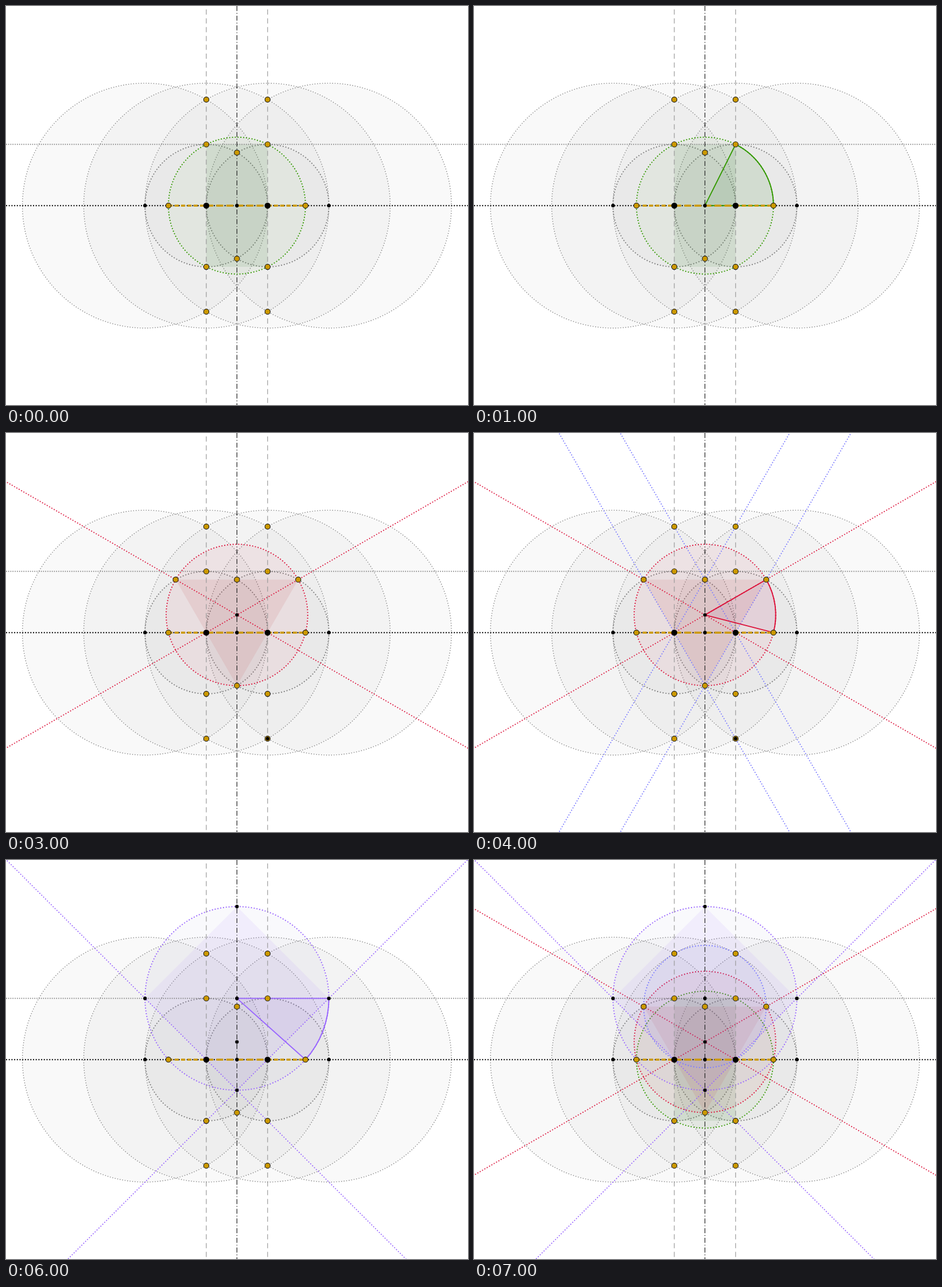
Recreate the animation shown at these times as an HTML page. Size 805 by 696 pixels, loop 8000 ms.

```html
<!DOCTYPE html>
<html lang="en">
<head>
<meta charset="utf-8">
<title>Compass construction</title>
<style>
html, body { margin: 0; width: 100%; height: 100%; overflow: hidden; background: #fff; }
svg { display: block; width: 805px; height: 696px; }
.step { animation: 8s step-end infinite; }
</style>
</head>
<body>
<svg id="stage" viewBox="0 0 805 696" fill="none"></svg>
<script>
const W = 805, H = 696;
const U = 106.8, CX = 402.4, CY = 348.2;
const AX = CX - U / 2, BX = CX + U / 2, LX = AX - U, RX = BX + U;
const TOP = CY - U, H3 = U * Math.sqrt(3) / 2;
const GOLDEN = U * Math.sqrt(5) / 2;          // half length of the gold segment
const RED_R = 2 * U / Math.sqrt(3), RED_Y = CY + H3 - RED_R;
const SQ_R = 1.5 * U;
const GREEN = '#339900', RED = '#dc143c', BLUE = '#7d7dff', PURPLE = '#9966ff', GOLD = '#cc9900';

// Shows a group during the steps marked 1; each step lasts one second.
let css = '';
function step(marks, content) {
  const name = 's' + marks;
  if (!css.includes(name + '{')) {
    const keys = [...marks].map((m, i) => `${i * 12.5}%{opacity:${m}}`).join('');
    css += `@keyframes ${name}{${keys}100%{opacity:${marks[0]}}}`;
  }
  return `<g class="step" style="animation-name:${name}">${content}</g>`;
}

const circle = (x, y, r, color, width, fill = color) =>
  `<circle cx="${x}" cy="${y}" r="${r}" fill="${fill}" fill-opacity=".05" stroke="${color}" stroke-width="${width}" stroke-dasharray="${width} 3"/>`;
const line = (x1, y1, x2, y2, color, width, dash) =>
  `<path d="M${x1} ${y1}L${x2} ${y2}" stroke="${color}" stroke-width="${width}" stroke-dasharray="${dash}"/>`;
const shape = (pts, color) =>
  `<polygon points="${pts.join(' ')}" fill="${color}" fill-opacity=".08"/>`;
const sector = (x, y, r, x1, y1, x2, y2, color, fill) =>
  `<path d="M${x} ${y}L${x1} ${y1}A${r} ${r} 0 0 1 ${x2} ${y2}Z" fill="${fill}" fill-opacity=".07" stroke="${color}" stroke-width="1.9" stroke-linejoin="round"/>`;
const dot = (x, y, r = 3.1) => `<circle cx="${x}" cy="${y}" r="${r}" fill="#000"/>`;
const gold = (x, y) =>
  `<circle cx="${x}" cy="${y}" r="4.6" fill="${GOLD}" stroke="#1a1a1a" stroke-width="1.1"/>`;
// A dotted line through (x, y) and its mirror image about that point's vertical.
const cross = (x, y, slope, color) => [slope, -slope].map(m =>
  line(x - 600, y - 600 * m, x + 600, y + 600 * m, color, 1.8, '1.8 2.9')).join('');

const out = [];

// Base circles
for (const x of [LX, AX, BX, RX]) out.push(circle(x, CY, 2 * U, '#808080', 1.4));
for (const x of [AX, BX]) out.push(circle(x, CY, U, '#808080', 1.9));

// Coloured figures
out.push(
  step('11000001', circle(CX, CY, GOLDEN, GREEN, 1.9, '#6aa83a') +
    shape([AX, TOP, BX, TOP, BX, CY + U, AX, CY + U], '#006400')),
  step('00111001', circle(CX, RED_Y, RED_R, RED, 1.9) +
    shape([CX - U, CY - H3, CX + U, CY - H3, CX, CY + H3], '#b01010') +
    cross(CX, RED_Y, 1 / Math.sqrt(3), RED)),
  step('00101000', cross(AX, CY, Math.sqrt(3), BLUE) + cross(BX, CY, Math.sqrt(3), BLUE)),
  step('00000111', circle(CX, TOP, SQ_R, PURPLE, 1.9, '#8080c0') +
    shape([CX, TOP - SQ_R, RX, TOP, CX, TOP + SQ_R, LX, TOP], PURPLE) +
    cross(CX, TOP + SQ_R, 1, PURPLE)),
  step('00000001', circle(CX, CY - H3, U, BLUE, 1.9))
);

// Guide lines
out.push(
  line(0, TOP, W, TOP, '#808080', 1.6, '1.6 2.2'),
  line(0, CY, W, CY, '#000', 2, '2 2.7'),
  line(AX, 6, AX, H, '#999', 1.2, '9 6.4'),
  line(BX, 6, BX, H, '#999', 1.2, '9 6.4'),
  line(CX, 0, CX, H, '#222', 1.2, '8.7 3.4 1.4 3.4')
);

// Sectors
const EX = CX + GOLDEN;
out.push(
  step('01000000', sector(CX, CY, GOLDEN, BX, TOP, EX, CY, GREEN, '#006400')),
  step('00001000', sector(CX, RED_Y, RED_R, CX + U, CY - H3, EX, CY, RED, '#a03080')),
  step('00000010', sector(CX, TOP, SQ_R, RX, TOP, EX, CY, PURPLE, PURPLE))
);

// Gold segment
out.push(
  line(CX - GOLDEN, CY, AX, CY, GOLD, 3.6, '7 4'),
  line(AX, CY, BX, CY, GOLD, 3.6, '12 5.5'),
  line(BX, CY, EX, CY, GOLD, 3.6, '7 4')
);

// Points
for (const x of [AX, BX]) {
  for (const d of [-2 * H3, -U, U, 2 * H3]) out.push(gold(x, CY + d));
  out.push(dot(x, CY, 5.2));
}
for (const d of [-H3, H3]) out.push(gold(CX, CY + d));
for (const d of [-GOLDEN, GOLDEN]) out.push(gold(CX + d, CY));
for (const x of [LX, CX, RX]) out.push(dot(x, CY));
out.push(
  step('00111001', gold(CX - U, CY - H3) + gold(CX + U, CY - H3)),
  step('00111000', dot(BX, CY + 2 * H3)),
  step('00111111', dot(CX, RED_Y)),
  step('00000111', dot(CX, TOP - SQ_R) + dot(CX, TOP) + dot(CX, TOP + SQ_R) +
    dot(LX, TOP) + dot(RX, TOP))
);

const style = document.createElement('style');
style.textContent = css;
document.head.append(style);
document.getElementById('stage').innerHTML = out.join('');
</script>
</body>
</html>
```
